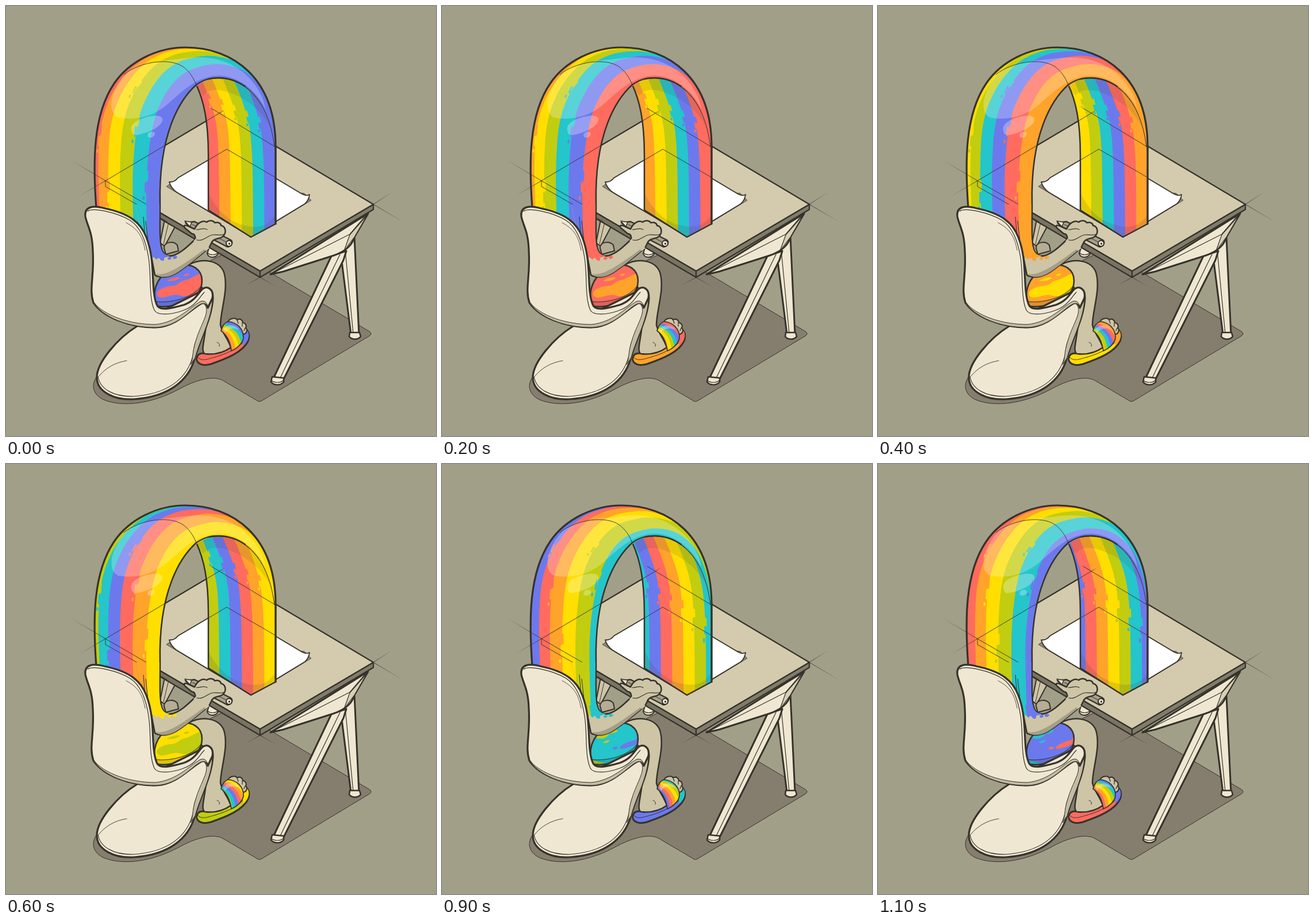
Animation of 748 by 748 pixels, one loop 1.2 s. Source, as an HTML page with a canvas:

```html
<!DOCTYPE html>
<html lang="en">
<head>
<meta charset="utf-8">
<title>Rainbow at the drawing desk</title>
<style>
html, body { margin: 0; width: 100%; height: 100%; overflow: hidden; background: #a29f89; }
canvas { display: block; width: 748px; height: 748px; }
</style>
</head>
<body>
<canvas id="stage" width="748" height="748"></canvas>
<script>
const ctx = document.getElementById('stage').getContext('2d');
const INK = '#35322b', CREAM = '#efe7d1', SKIN = '#cec5a7', TOP = '#d4cbae', SIDE = '#817b6a';
const RAINBOW = ['#ff6b5f', '#ffa32b', '#ffde00', '#c2cd10', '#24c5cb', '#6c79ed'];
const hue = i => RAINBOW[((i % 6) + 6) % 6];

// Cross-sections of each striped surface: left x, y, right x, y, first visible half-stripe, falloff
const front = { max: 11, rows: [
  [161, 445, 272, 445, 0, 1.25], [157, 350, 268, 350, 0, 1.25], [154, 270, 271, 270, 0, 1.25],
  [161, 195, 288, 195, 0, 1.38], [188, 135, 305, 160, 0, 1.45], [235, 91, 322, 142, .4, 1.7],
  [280, 76, 338, 133, .8, 2.1], [315, 72, 352, 128, 1, 2.3], [355, 77, 372, 125, 3, 2.6],
  [400, 93, 400, 129, 5, 2.8], [430, 117, 425, 143, 7, 2.2], [452, 152, 446, 167, 8, 2],
  [465, 200, 461, 210, 9, 2], [469, 245, 467, 245, 9.5, 2]] };
const back = { max: 12, rows: [
  [352, 412, 469, 412, 0, 1], [351, 300, 469, 300, 0, 1], [350, 240, 466, 240, 0, 1],
  [347, 200, 460, 200, 0, 1], [335, 160, 447, 160, 0, 1], [320, 122, 430, 122, 0, 1]] };
const strap = { max: 11, rows: [
  [374, 566, 384, 549, 0, 1], [381, 572, 401, 553, 0, 1],
  [388, 584, 415, 566, 0, 1], [391, 602, 422, 584, 0, 1]] };

const archShape = `M157 352C151 270 151 190 188 135C215 95 265 72 312 72C395 72 469 125 469 245
  L467 245C455 150 405 125 370 125C314 125 262 210 268 345C267 385 266 415 273 430
  C276 436 270 438 271 442C267 444 265 438 263 436C262 440 259 441 256 438L246 434L160 420Z`;
const backShape = `M331 137C344 165 352 200 352 260L352 355L426 402L469 379L469 245
  C455 150 405 125 370 125C352 125 340 130 331 137Z`;
const strapShape = 'M374 565C376 556 380 551 386 549C402 550 414 562 413 578C411 588 400 597 392 600C390 585 384 572 374 565Z';
const shortsShape = 'M258 505C258 480 275 458 300 452C325 446 341 459 341 478C341 500 325 512 300 519C280 524 262 525 258 518Z';

function draw(d, fill, width = 0, stroke = INK) {
  const path = new Path2D(d);
  if (fill) { ctx.fillStyle = fill; ctx.fill(path); }
  if (width) { ctx.lineWidth = width; ctx.strokeStyle = stroke; ctx.stroke(path); }
}

function clipped(d, paint) {
  ctx.save();
  ctx.clip(new Path2D(d));
  paint();
  ctx.restore();
}

function onRow([lx, ly, rx, ry, first, power], s, max) {
  const u = (s - first) / (max - first);
  const f = u < 0 ? u / 2 : u ** power;
  return [lx + (rx - lx) * f, ly + (ry - ly) * f];
}

function onTube({ rows, max }, q, s) {
  const n = Math.min(Math.floor(q), rows.length - 2), f = q - n;
  const a = onRow(rows[n], s, max), b = onRow(rows[n + 1], s, max);
  return [a[0] + (b[0] - a[0]) * f, a[1] + (b[1] - a[1]) * f];
}

function fillFrom({ rows, max }, s, color) {
  const line = rows.map(r => onRow(r, s, max));
  const rim = rows.map(r => onRow(r, max * 1.15, max)).reverse();
  ctx.beginPath();
  ctx.moveTo(...line[0]);
  for (let i = 1; i < line.length - 1; i++) {
    const [x, y] = line[i], [nx, ny] = line[i + 1];
    ctx.quadraticCurveTo(x, y, (x + nx) / 2, (y + ny) / 2);
  }
  ctx.lineTo(...line.at(-1));
  rim.forEach(p => ctx.lineTo(...p));
  ctx.fillStyle = color;
  ctx.fill();
}

function dash(tube, q, len, s, width, color) {
  ctx.beginPath();
  ctx.moveTo(...onTube(tube, q, s));
  ctx.lineTo(...onTube(tube, q + len, s));
  ctx.lineWidth = width;
  ctx.strokeStyle = color;
  ctx.stroke();
}

// Every stripe is two half-stripes wide and slides by one half-stripe per step
function stripes(tube, step, offset, drips) {
  const start = Math.floor((step + offset) / 2);
  const edge = i => 2 * i - offset - step;
  for (let i = start; edge(i) < tube.max; i++)
    fillFrom(tube, i === start ? -3 : edge(i), hue(i));
  if (!drips) return;
  const span = tube.rows.length > 8 ? 5 : 4;
  for (let i = start + 1; edge(i) < tube.max; i++) {
    const s = edge(i), q = 1 + (s * 1.37) % (span - 1);
    dash(tube, q, .2, s - .1, 3, hue(i));
    dash(tube, q + .25, .2, s + .1, 3, hue(i - 1));
    dash(tube, q - .15, .04, s - .35, 3.5, hue(i));
  }
}

function floorAndLegs() {
  draw('M170 632C145 652 147 674 170 685C205 699 255 691 300 667C327 652 362 640 380 653L436 686Q440 690 446 686L632 574Q638 570 632 566L430 446L382 430L300 470Z', '#857e6f', 1);
  draw('M276 372L268 412L276 418L294 384Z', SKIN, 2);
  draw('M283 376L274 414', null, 1);
  draw('M353 421L366 421L369 431C365 439 353 439 350 431Z', CREAM, 2);
  draw('M350 429C355 434 364 434 369 429', null, 1.2);
  // Right trestle
  draw('M582 428L606 401L614 571L600 571Z', CREAM, 3);
  draw('M590 424L604 570', null, 1.2);
  draw('M598 568L615 568L617 575C612 581 602 581 597 575Z', CREAM, 2.5);
  draw('M566 435L592 426L587 442L483 649L466 646Z', CREAM, 3);
  draw('M581 432L477 647', null, 1.2);
  draw('M463 645L483 647L483 654C477 661 466 660 461 654Z', CREAM, 2.5);
  draw('M461 651C467 656 477 656 483 651', null, 1.2);
  draw('M460 467L630 361L606 402C602 416 592 426 570 434L482 462Z', CREAM, 3);
  draw('M464 465L598 397L627 363', null, 1.2);
  draw('M598 398L628 364L606 402L588 426Z', '#d8cfb5', 1.2);
}

function desk() {
  draw('M173 304L442 461L442 472L173 314Z', '#797363', 2.2);
  draw('M442 461L639 345L639 354L442 472Z', SIDE, 2.2);
  draw('M173 304L372 186L639 345L442 461Z', TOP, 2.2);
  draw('M519 326L531 338L426 402L279 314L286 309Z', '#8c8674', .7);
  draw('M384 249L515 327Q522 331 528 328Q527 337 520 344L426 401L297 324Q287 317 284 306Q293 307 299 299Z', '#fff', 1.8);
}

function rainbow(step) {
  clipped(backShape, () => {
    stripes(back, step, 0, true);
    draw('M320 125L475 120L475 245C455 188 425 164 390 151C371 144 354 143 343 156Z', 'rgba(75,65,60,.13)');
    draw('M350 320C365 355 390 381 430 384C450 385 462 375 470 360L470 410L350 410Z', 'rgba(75,65,60,.15)');
  });
  draw(backShape, null, 2.5);
  clipped(archShape, () => {
    stripes(front, step, 1, true);
    draw('M184 164C188 145 201 123 216 112C241 96 285 94 320 90C365 86 399 101 421 123C438 140 449 161 451 179C438 152 409 122 371 121C335 121 310 145 282 170C258 192 225 200 195 194C185 189 182 179 184 164Z', 'rgba(255,255,255,.24)');
    draw('M218 216C215 203 235 195 251 192C270 188 276 195 270 204C260 217 237 223 225 225Q219 224 218 216ZM247 222C251 217 260 218 259 223C257 230 248 231 246 226Z', 'rgba(255,255,255,.28)');
  });
  draw('M157 352C151 270 151 190 188 135C215 95 265 72 312 72C395 72 469 125 469 245L469 379', null, 3.2);
  draw('M331 137C304 161 265 220 268 345C268 385 266 415 273 430', null, 2.5);
  draw('M331 137C345 127 357 125 370 125C384 125 400 129 416 140', null, 2.3);
  draw('M370 125C405 125 455 150 467 245', null, 1);
}

// A construction line that thins out towards its far end
function tail(x, y, farX, farY) {
  const fade = ctx.createLinearGradient(x, y, farX, farY);
  fade.addColorStop(0, INK);
  fade.addColorStop(1, 'rgba(53,50,43,.1)');
  draw(`M${x} ${y}L${farX} ${farY}`, null, .9, fade);
}

function guides() {
  draw('M173 304L282 367M173 304L372 186M173 304L173 314L280 375M357 178L470 246M352 268L384 249L470 299', null, .9);
  draw('M205 119C235 96 284 90 307 105C319 113 326 125 331 137', null, .9);
  tail(173, 304, 116, 270);
  tail(173, 304, 132, 328);
  tail(372, 186, 380, 181);
  tail(639, 345, 670, 325);
  tail(639, 345, 688, 374);
  tail(442, 472, 420, 484);
  tail(442, 472, 468, 487);
}

function legAndSlipper(step) {
  const sole = hue(Math.ceil(step / 2)), last = hue(Math.floor((step + 11) / 2));
  draw('M333 609C338 600 350 607 365 602L410 562C419 558 426 570 421 583C412 602 385 613 356 623C337 628 328 618 333 609Z', sole, 3);
  draw('M333 611C341 619 351 614 363 611C386 604 409 594 419 576', null, 1);
  draw('M417 562C426 569 423 582 413 591L411 576Z', last);
  draw('M386 550C389 542 400 542 402 546C408 542 412 548 412 551C417 551 419 557 417 560C421 564 418 571 412 571L395 563Z', SKIN, 2);
  draw('M402 546L404 552M411 551L411 557M416 560L414 565', null, 1.3);
  draw('M318 450C343 437 371 443 379 463C388 492 373 529 373 555C377 571 386 578 391 594C380 602 364 607 346 605C340 602 343 590 346 571C349 546 357 523 359 506L341 490Z', SKIN, 2.5);
  draw('M367 585Q373 587 371 592', null, 1);
  clipped(strapShape, () => {
    stripes(strap, step, 1, false);
    draw('M378 562C386 552 402 554 406 564C397 559 387 560 381 569Z', 'rgba(255,255,255,.3)');
  });
  draw(strapShape, null, 1.6);
}

function shorts(step) {
  const k = Math.floor(step / 2), old = hue(k + 5), fresh = hue(k + 6);
  clipped(shortsShape, () => {
    draw(shortsShape, step % 2 ? fresh : old);
    if (step % 2) {
      draw('M255 480C266 473 276 481 284 476C295 471 285 469 298 468C306 467 309 461 299 462C313 457 316 451 310 448L270 448Z', old);
      draw('M345 470L336 480C324 483 317 486 311 491C305 496 315 497 323 493C332 491 341 486 345 482ZM298 493C305 490 309 493 303 496Q294 498 298 493Z', hue(k + 7));
      draw('M256 514C271 517 277 520 288 521L258 527Z', old);
      draw('M280 484Q293 477 291 482Q284 488 280 484Z', old);
    } else {
      draw('M345 465C330 465 325 474 311 477C297 481 301 486 288 487C276 488 260 494 263 503C270 514 287 500 300 503C320 509 343 500 345 485Z', fresh);
      draw('M280 478C289 472 304 470 302 474Q291 480 280 478ZM309 468Q318 463 319 467Q312 472 309 468Z', fresh);
    }
    draw('M256 513C287 517 324 509 342 482L342 525L256 528Z', 'rgba(60,50,70,.17)');
  });
  draw(shortsShape, null, 2.5);
  draw('M259 514C287 518 325 507 339 488', null, 1);
}

function arm() {
  draw('M275 421C275 410 291 408 298 416L300 426L278 432Z', '#b5ad95', 2);
  draw('M246 400L270 420C273 432 281 437 291 434C306 429 318 416 329 406L352 422C332 438 310 457 294 466C281 473 266 473 259 468Z', SKIN, 2.5);
  draw('M260 466C277 470 300 457 349 420L352 422C332 438 310 457 294 466C281 473 266 473 260 466Z', '#a69e87');
}

function sleeve(step) {
  clipped('M225 345L268 345C267 385 266 415 273 430L262 440L244 430Z', () => stripes(front, step, 1, false));
  draw('M268 345C268 385 266 415 273 430', null, 2);
  draw('M239 367L242 404M243 374L248 418', null, 1);
  const color = hue(Math.floor((step + 11) / 2));
  draw('M256 420L269 418C271 430 277 434 284 434C281 439 275 435 275 440C276 445 269 444 267 439C264 436 263 443 260 440Z', color);
  draw('M281 438C286 434 291 438 286 441Q281 443 281 438ZM290 436Q296 432 298 437Q295 442 290 439Z', color);
}

function hand() {
  draw('M312 377L328 375L391 407C396 411 392 419 385 419L322 386Z', '#a7a08b', 2.3);
  draw('M311 374L323 376L320 384Z', CREAM, 1.5);
  draw('M324 380L382 410', null, 1);
  draw('M383 412A5 5 0 1 0 393 414A5 5 0 1 0 383 412Z', CREAM, 2);
  draw('M387 413A1.3 1.3 0 1 0 390 414A1.3 1.3 0 1 0 387 413Z', INK);
  draw('M329 407C330 399 327 396 323 396L311 386Q308 380 315 382L328 388C333 377 342 372 349 376C353 372 361 373 363 377C370 375 374 379 374 382C382 383 384 394 378 400C372 407 361 402 357 413L352 423Z', SKIN, 2.5);
  // Open the wrist into the forearm
  draw('M326 409L330 405L354 421L348 426Z', SKIN);
  draw('M331 389C338 389 344 385 350 389M332 407C343 410 351 399 360 398C368 397 374 400 379 397', null, 1.2);
}

function chair() {
  draw('M228 557C194 578 158 620 158 646C158 672 190 686 222 684C286 680 318 649 328 614C338 577 358 545 360 508C360 492 348 484 340 496L262 535Z', CREAM, 3.2);
  draw('M350 520C352 550 327 574 326 604C317 649 280 675 222 679C188 680 164 667 160 645', null, 1.2);
  draw('M346 520C356 532 338 555 331 580C323 603 326 615 321 624L329 612C337 580 359 543 359 508Z', '#c4bca2', 1);
  draw('M160 646C172 630 190 620 210 617', null, .9);
  draw('M138 366C136 349 151 346 172 352C216 361 235 378 244 402C261 445 251 490 262 519C266 532 288 526 309 520C329 513 334 500 341 493C350 485 362 493 359 508L351 525Q348 514 339 518C318 530 297 557 262 559C215 560 169 541 152 516C144 492 154 470 151 425C150 391 141 382 138 366Z', CREAM, 3.2);
  draw('M151 514C171 540 218 554 260 554C297 550 318 526 338 514Q348 510 351 523C347 514 339 517 330 524C310 540 292 557 262 559C213 560 167 541 151 514Z', '#c4bca2', 1);
  draw('M142 357C151 350 193 359 216 373C236 386 244 412 248 438C253 470 248 506 258 529C263 539 288 537 307 530C331 522 337 505 345 498', null, 1.2);
  draw('M209 377C232 389 238 404 242 425', null, .8);
}

function frame(now) {
  const step = Math.floor(now / 100) % 12;
  ctx.lineJoin = ctx.lineCap = 'round';
  ctx.fillStyle = '#a29f89';
  ctx.fillRect(0, 0, 748, 748);
  floorAndLegs();
  desk();
  rainbow(step);
  guides();
  legAndSlipper(step);
  shorts(step);
  arm();
  sleeve(step);
  hand();
  chair();
  requestAnimationFrame(frame);
}
requestAnimationFrame(frame);
</script>
</body>
</html>
```
